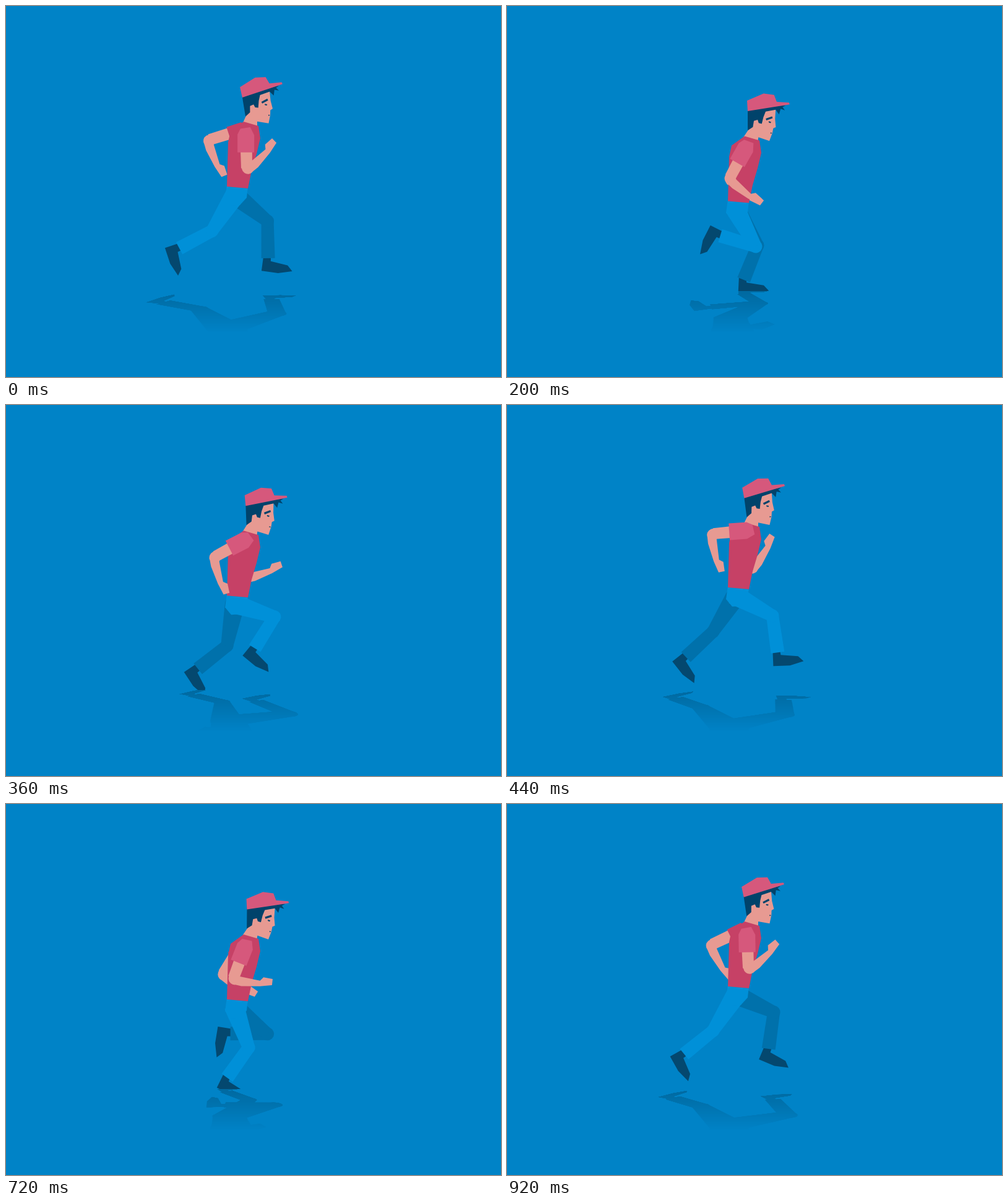
An HTML page without scripts for the animation above (960 ms loop, 800x600 px).

```html
<!DOCTYPE html>
<html lang="en">
<head>
<meta charset="utf-8">
<title>Runner</title>
<style>
  @property --bob { syntax: "<length>"; inherits: true; initial-value: 0px }
  @property --tilt { syntax: "<angle>"; inherits: true; initial-value: 0deg }
  @property --near-thigh { syntax: "<angle>"; inherits: true; initial-value: 0deg }
  @property --near-shin { syntax: "<angle>"; inherits: true; initial-value: 0deg }
  @property --near-foot { syntax: "<angle>"; inherits: true; initial-value: 0deg }
  @property --far-thigh { syntax: "<angle>"; inherits: true; initial-value: 0deg }
  @property --far-shin { syntax: "<angle>"; inherits: true; initial-value: 0deg }
  @property --far-foot { syntax: "<angle>"; inherits: true; initial-value: 0deg }
  @property --near-arm { syntax: "<angle>"; inherits: true; initial-value: 0deg }
  @property --near-fore { syntax: "<angle>"; inherits: true; initial-value: 0deg }
  @property --far-arm { syntax: "<angle>"; inherits: true; initial-value: 0deg }
  @property --far-fore { syntax: "<angle>"; inherits: true; initial-value: 0deg }

  html, body { margin: 0; width: 100%; height: 100%; overflow: hidden; background: #0083c7 }
  body { position: relative; animation: stride .96s infinite, swing .96s infinite }
  svg { position: absolute; left: 0; display: block; overflow: hidden }

  /* Angles are absolute: 0 hangs straight down, negative points forward. */
  @keyframes stride {
    0%, 100% { --bob: -15px; --tilt: -6deg; --near-thigh: 32deg; --near-shin: 62deg; --near-foot: 74deg; --far-thigh: -52deg; --far-shin: -1deg; --far-foot: 10deg; animation-timing-function: steps(3) }
    12.5% { --bob: 0px; --tilt: 0deg; --near-thigh: 2deg; --near-shin: 116deg; --near-foot: 131deg; --far-thigh: -46deg; --far-shin: -1deg; --far-foot: 7deg; animation-timing-function: steps(2) }
    20.83% { --bob: 8.5px; --tilt: 3.5deg; --near-thigh: -29deg; --near-shin: 107deg; --near-foot: 119deg; --far-thigh: -32deg; --far-shin: 22deg; --far-foot: 5deg; animation-timing-function: steps(2) }
    29.16% { --bob: 11px; --tilt: 5deg; --near-thigh: -63deg; --near-shin: 79deg; --near-foot: 87deg; --far-thigh: -21deg; --far-shin: 46deg; --far-foot: 47deg; animation-timing-function: steps(1) }
    33.33% { --bob: 8px; --tilt: 4deg; --near-thigh: -78deg; --near-shin: 52deg; --near-foot: 62deg; --far-thigh: -1deg; --far-shin: 54deg; --far-foot: 61deg; animation-timing-function: steps(3) }
    45.83% { --bob: -12px; --tilt: -4deg; --near-thigh: -62deg; --near-shin: -8deg; --near-foot: 0deg; --far-thigh: 32deg; --far-shin: 47deg; --far-foot: 54deg; animation-timing-function: steps(4) }
    62.5% { --bob: 0px; --tilt: .5deg; --near-thigh: -41deg; --near-shin: -6deg; --near-foot: 1deg; --far-thigh: -1deg; --far-shin: 125deg; --far-foot: 139deg; animation-timing-function: steps(2) }
    70.83% { --bob: 8px; --tilt: 3.5deg; --near-thigh: -31deg; --near-shin: 23deg; --near-foot: 4deg; --far-thigh: -33deg; --far-shin: 112deg; --far-foot: 124deg; animation-timing-function: steps(2) }
    79.16% { --bob: 10px; --tilt: 4.5deg; --near-thigh: -9deg; --near-shin: 48deg; --near-foot: 53deg; --far-thigh: -71deg; --far-shin: 69deg; --far-foot: 79deg; animation-timing-function: steps(1) }
    83.33% { --bob: 7px; --tilt: 3.5deg; --near-thigh: 7deg; --near-shin: 57deg; --near-foot: 62deg; --far-thigh: -86deg; --far-shin: 46deg; --far-foot: 58deg; animation-timing-function: steps(3) }
    95.83% { --bob: -12px; --tilt: -5deg; --near-thigh: 32deg; --near-shin: 51deg; --near-foot: 63deg; --far-thigh: -66deg; --far-shin: 8deg; --far-foot: 25deg; animation-timing-function: steps(1) }
  }
  @keyframes swing {
    0%, 100% { --near-arm: -2deg; --near-fore: -135deg; --far-arm: 72deg; --far-fore: -22deg; animation-timing-function: steps(3) }
    12.5% { --near-arm: 18deg; --near-fore: -82deg; --far-arm: 34deg; --far-fore: -34deg; animation-timing-function: steps(4) }
    29.16% { --near-arm: 37deg; --near-fore: -20deg; --far-arm: 4deg; --far-fore: -70deg; animation-timing-function: steps(4) }
    45.83% { --near-arm: 84deg; --near-fore: -12deg; --far-arm: -13deg; --far-fore: -147deg; animation-timing-function: steps(4) }
    62.5% { --near-arm: 52deg; --near-fore: -32deg; --far-arm: 19deg; --far-fore: -90deg; animation-timing-function: steps(5) }
    83.33% { --near-arm: -2deg; --near-fore: -118deg; --far-arm: 40deg; --far-fore: -36deg; animation-timing-function: steps(3) }
    95.83% { --near-arm: -3deg; --near-fore: -132deg; --far-arm: 64deg; --far-fore: -29deg; animation-timing-function: steps(1) }
  }

  .near {
    --thigh: var(--near-thigh); --shin: var(--near-shin); --foot: var(--near-foot);
    --arm: var(--near-arm); --fore: var(--near-fore); --shoulder: 392px, 219px;
    --cloth: #0090d8;
  }
  .far {
    --thigh: var(--far-thigh); --shin: var(--far-shin); --foot: var(--far-foot);
    --arm: var(--far-arm); --fore: var(--far-fore); --shoulder: 386px, 218px;
    --cloth: #0071ab;
  }
  .body { transform: translateY(var(--bob)) }
  .head { transform: translate(394.3px, 205px) rotate(var(--tilt)) translate(-395px, -205px) }
  .thigh { transform: translate(369px, 321px) rotate(var(--thigh)); fill: var(--cloth) }
  .shin { transform: translateY(68px) rotate(calc(var(--shin) - var(--thigh))) }
  .foot { transform: translateY(60px) rotate(calc(var(--foot) - var(--shin))); fill: #04486f }
  .arm { transform: translate(var(--shoulder)) rotate(var(--arm)) translate(-5px, 5px) }
  .fore { transform: translateY(53px) rotate(calc(var(--fore) - var(--arm))) }

  .skin { fill: #e79a92 }
  .shirt { fill: #c64166 }
  .light { fill: #d6587c }
  .dark { fill: #00436b }

  /* Floor reflection: the runner laid flat in perspective. */
  .floor {
    position: absolute; left: 0; top: 455px; width: 800px; height: 73px; overflow: hidden;
    filter: brightness(0) opacity(.19);
    -webkit-mask-image: linear-gradient(#000 12%, transparent);
    mask-image: linear-gradient(#000 12%, transparent);
  }
  .floor svg {
    top: -165px; transform-origin: 390px 165px;
    transform: translateY(7px) matrix3d(1, 0, 0, 0, 0, -.22, 0, .00296, 0, 0, 1, 0, 0, 0, 0, 1);
  }
</style>
</head>
<body>
<div class="floor">
  <svg width="800" height="171" viewBox="0 290 800 171"><use href="#runner"/></svg>
</div>
<svg style="top:0" width="800" height="461" viewBox="0 0 800 461">
  <defs>
    <path id="shoe" d="M-8-3 4-3 5 4 33 6 42 14 20 21-7 22Z"/>
    <path id="calf" d="M-10 0A10 10 0 0 1 10 0L11 60-11 60Z"/>
    <circle id="knee" r="10.5"/>
    <path id="femur" d="M-15-4-15 4-10 68 10 68 16 8 16-4Z"/>
    <path id="upper" d="M-9 16-9 53 9 53 10 16Z"/>
    <path id="lower" d="M-11 4-12 14-9 44-5 63 5 63 6 48 0 43 3 10 9 0A9.5 9.5 0 1 0-11 4Z"/>
  </defs>
  <g id="runner">
    <g class="body">
      <g class="far">
        <g class="arm skin">
          <use href="#upper"/>
          <g class="fore"><use href="#lower"/></g>
          <path class="shirt" d="M-11 21-11-4 9-8 11 21Z"/>
        </g>
        <g class="thigh">
          <g class="shin">
            <g class="foot"><use href="#shoe"/></g>
            <use href="#calf"/><use href="#knee"/>
          </g>
          <use href="#femur"/>
        </g>
      </g>
      <g class="near">
        <g class="thigh">
          <g class="shin">
            <g class="foot"><use href="#shoe"/></g>
            <use href="#calf"/><use href="#knee"/>
          </g>
          <use href="#femur"/>
        </g>
        <path fill="#0090d8" d="M357 304 391 306 389 325 378 337 364 338 354 326Z"/>
      </g>
      <g class="head">
        <path class="skin" d="M383 204 390 192 398 174 414 159 432 156 432 172 434 185 430 187 429 195 425 208 407 203 406 212Z"/>
        <path class="dark" d="M387 160 432 151 448 149 443 152 447 157 440 155 438 164 432 157 416 161 413 170 411 181 406 180 404 175 398 177 397 187 389 193Z"/>
        <path class="light" d="M385 145 411 132 428 133 433 144 453 144 454 147 432 152 387 162Z"/>
        <path class="dark" d="M417 172 427 168 428 171 418 175ZM422 176 426 177 425 179 422 178ZM426 194 429 195 426 196Z"/>
      </g>
      <path class="shirt" d="M384 202 408 209 411 229 405 254 397 281 391 310 357 307 359 235 363 217Z"/>
      <g class="near">
        <g class="arm skin">
          <use href="#upper"/>
          <g class="fore"><use href="#lower"/></g>
          <path class="light" d="M-14 27-13-2-8-11 8-13 14 0 13 28Z"/>
        </g>
      </g>
    </g>
  </g>
</svg>
</body>
</html>
```
